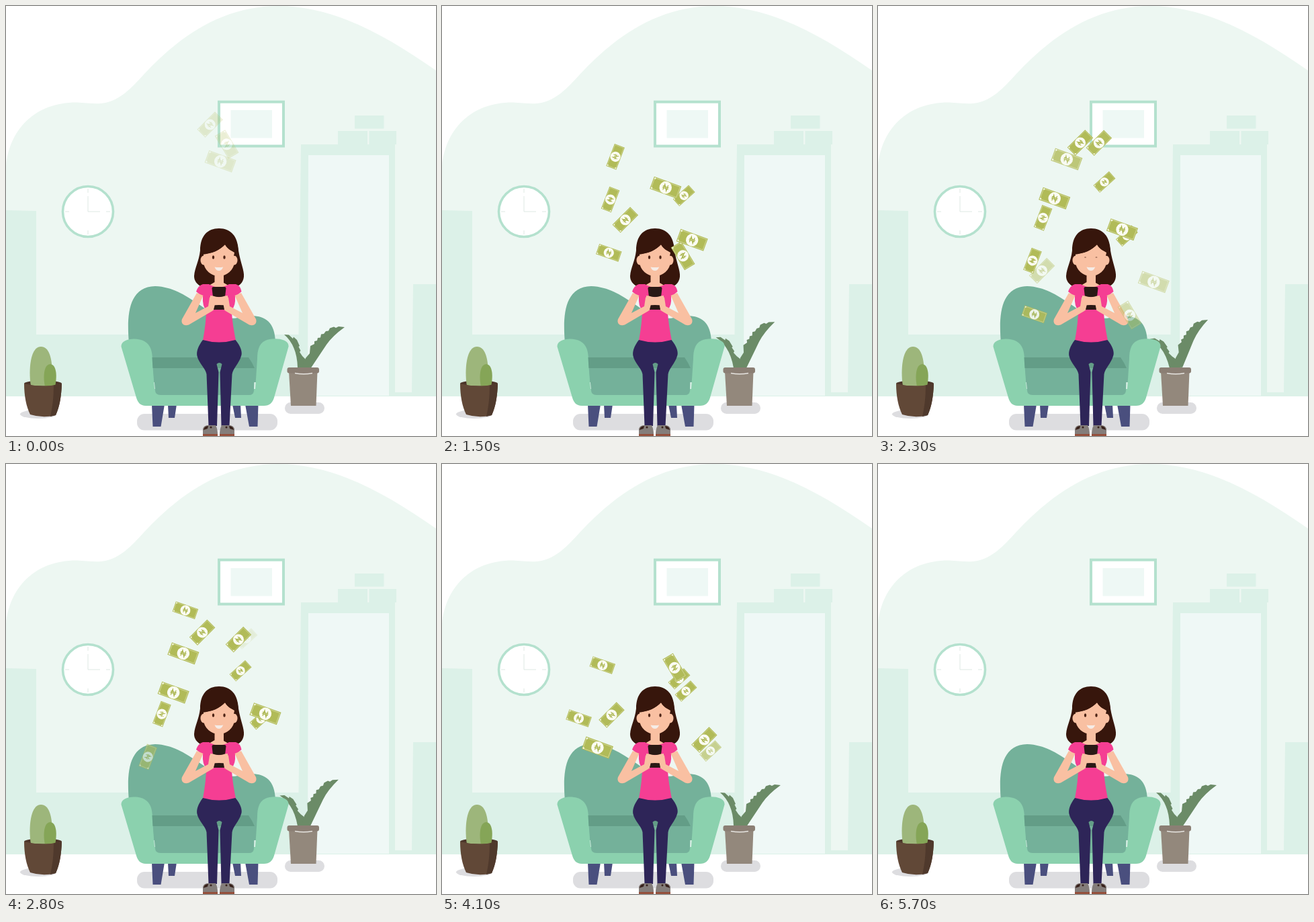
An HTML page for the animation above (5800 ms loop, 640 by 640 pixels).

```html
<!DOCTYPE html>
<html lang="en">
<head>
<meta charset="utf-8">
<title>Money rain</title>
<style>
html, body { margin: 0; width: 100%; height: 100%; overflow: hidden; background: #fff; }
svg { display: block; width: 100%; height: 100%; }
</style>
</head>
<body>
<svg viewBox="0 0 640 640" xmlns="http://www.w3.org/2000/svg">
  <defs>
    <g id="note">
      <rect x="-21.5" y="-9.8" width="43" height="19.6" fill="#b1bb58"/>
      <rect x="-20" y="-8.3" width="40" height="16.6" fill="none" stroke="#dfe4b4" stroke-width=".6"/>
      <path d="M-19.3 -7.6H19.3M-19.3 7.6H19.3" stroke="#f4f6e2" stroke-width="2.6" stroke-linecap="round" stroke-dasharray="0 38.6"/>
      <circle r="9.2" fill="#fbfcf3"/>
      <path d="M-2.6 4.4V-4.4L2.6 4.4V-4.4M-4.6 -1.1H4.6M-4.6 1.1H4.6" fill="none" stroke="#a9b44c" stroke-width="1.2"/>
    </g>
  </defs>

  <!-- room -->
  <path fill="#edf7f2" d="M0 238C5 185 42 143 106 143.5C120 144 135 147 148 144C170 139 185 124 205 102C255 48 320 0 405 0C485 0 560 40 640 96V581H0Z"/>
  <path fill="#dcf1e8" d="M0 304L45 305V489H435.5L439 206H579V575H604L606 414H640V581H0Z"/>
  <path fill="#eff8f6" d="M450 222H570V580H449Z"/>
  <path fill="#dcf1e8" d="M519 163H562.5V182.5H519ZM494 186H538V207H494ZM540.5 186H581V206H540.5Z"/>
  <rect x="317" y="142.7" width="96" height="65.8" fill="#fff" stroke="#b4e1ce" stroke-width="4"/>
  <rect x="334.5" y="155" width="61.5" height="41.5" fill="#eef8f5"/>
  <circle cx="122" cy="306" r="37.5" fill="#fff" stroke="#b4e1ce" stroke-width="3.6"/>
  <path d="M122 283V306H140M122 272V278M122 334V340M88 306H94M149 306H155" fill="none" stroke="#dde8e3"/>

  <!-- cactus -->
  <ellipse cx="48" cy="607.5" rx="27" ry="6.5" fill="#dddde0"/>
  <ellipse cx="55" cy="562" rx="28" ry="4.5" fill="#4b3529"/>
  <path fill="#9db67b" d="M37 565C34 550 34 507 52 507C70 507 70 545 68 566Z"/>
  <path fill="#85a557" d="M58 566C55 553 56 533 66 533C76 534 76 553 73 566Z"/>
  <path fill="#614837" d="M27 562Q55 569 83 562C82.500 580 80 596 74 609Q55 614 36 608C30 596 27 580 27 562Z"/>
  <path fill="#4f392c" d="M71 564.500L83 562C82.500 580 80 596 74 609L66 611Q71 590 71 564.500Z"/>

  <!-- potted plant -->
  <rect x="415" y="590" width="59" height="17" rx="8.5" fill="#dddde0"/>
  <g id="leaves" fill="#6b8b67">
    <path d="M414 489L421 489.5L427 495L428 492.5L433 497L437 506L435.5 507L438.5 513L437 515L441 521L445 525L452 538H434Q433 505 414 489Z"/>
    <path d="M440 538L446 524L452 517L453 506L459 503L459 499L463 498L464 494L468 493.5L469 488.5L473 488L476 484L480 483.5L482 479.5L488 477.5L491 479L495 477L504 478Q486 491 477 504Q465 522 453 540Z"/>
  </g>
  <path fill="#93887c" d="M421 544H463.5L461.5 595H424Z"/>
  <rect x="418.5" y="538" width="47.5" height="8.5" rx="3" fill="#8b7f74"/>
  <path d="M430 546.5Q443 549 456 546.5" fill="none" stroke="#e6e4e0" stroke-width="1.3"/>

  <!-- sofa -->
  <rect x="195" y="607" width="209" height="24.5" rx="11" fill="#dddde0"/>
  <path fill="#4a4f7e" d="M217 593H236L230.5 626H218.5ZM241 593H254L251 613H242ZM337 593H349L350 613H341ZM356 593H375.5L374.5 626H362Z"/>
  <path fill="#74b19a" d="M183 502C180 465 180 418 222 417C250 418 268 432 290 446C305 457 325 468 345 464C376 457 400 462 401 500L385 560H210Z"/>
  <path fill="#8bd1ae" d="M171.5 507C171 494 196 493 206 499C217 505 218 518 218 530L221 570H371L374 525C374 512 377 502 386 498C396 493 422 494 420.5 507L399 583C396.5 591 392 595 384 595H208C200 595 196 590 194 583Z"/>
  <path fill="#639d87" d="M217.5 523H361Q366 530 370 539H218.5Z"/>
  <path fill="#74b19a" d="M219 539H370L369 573Q368 579 362 579H230Q222 579 222 572Z"/>

  <!-- woman -->
  <path fill="#37160c" d="M289 364C289 342 300 331 317 331C335 331 345 343 346 364C349 382 355 394 354 403C353 412 347 417 341 418H291C284 414 280 409 280 402C281 389 287 381 289 364Z"/>
  <path fill="#f9c0a2" d="M310.5 396H324V412L331 416L317 424L302 416L310.5 411Z"/>
  <path fill="#f9c0a2" d="M294 369C308 368 318 363 326 355C330 362 335 364 340 366V380C340 393 328 402 317 402C306 402 294 393 294 380Z"/>
  <g id="ear"><ellipse cx="294.5" cy="378.5" rx="5" ry="7" fill="#f9c0a2"/></g>
  <use href="#ear" transform="matrix(-1 0 0 1 634 0)"/>
  <path fill="#37160c" d="M289 370C308 369 318 363 326 355C331 363 336 364 340 367L339 372Q346 370 346 366C345 345 335 335 317 335C299 335 289 346 289 370Z"/>
  <g id="eyes" fill="#4d2416">
    <ellipse cx="308.5" rx="1.7" ry="2.8"/>
    <ellipse cx="325" rx="1.7" ry="2.8"/>
  </g>
  <path fill="#f5ece7" d="M310.5 388.5Q317 389.5 323.2 388.5Q321 394 317 394Q312.5 394 310.5 388.5Z"/>
  <path fill="#f53e93" d="M302 414Q317 423 332 414H342Q349 416 350.5 425L341 433Q342 446 336 452Q336 468 342 498L339 503H296L293 498Q298 470 298 453Q292 446 293 433L283 425Q286 416 293 414Z"/>
  <g id="arm">
    <path fill="#f9c0a2" d="M284 427L293.5 431L282 457L301 447L303 434Q306 430 311 433L316 447L307 454L272 474.5C264 477 260 472 262 466Z"/>
  </g>
  <use href="#arm" transform="matrix(-1 0 0 1 634 0)"/>
  <path fill="#2a1915" d="M306.5 420Q306.5 418 309 418H325Q327.5 418 327.5 420L326 433H308ZM311 444H323.5L325 452H309Z"/>
  <path fill="#f9c0a2" d="M304 431L308 431.5Q317 435 326 431.5L330 431V446Q317 444 304 446Z"/>
  <path fill="#2e2558" d="M293 497Q317 504 341.5 497C350 507 352 516 350 521C347 532 338 539 336.5 548L332.5 625H320.5L318.5 545L321.5 533Q317.5 529 313.5 533L316.5 545L314 625H301.5L298.5 548C297 539 287 532 284.5 521C283 515 286 506 293 497Z"/>
  <g id="shoe">
    <path fill="#847d7a" d="M293 638V629Q295 624 301 624H312Q315 629 315 638Z"/>
    <path fill="#38211b" d="M294 631Q295 625 301 625L300 629Z"/>
    <circle cx="305" cy="627" r="1.5" fill="#38211b"/>
    <rect x="293" y="637" width="22" height="3" fill="#95503c"/>
  </g>
  <use href="#shoe" transform="matrix(-1 0 0 1 633 0)"/>

  <g id="notes"></g>
</svg>
<script>
const LOOP = 5800, STEP = 100;
const LIFE = 2550, FADE_IN = 330, FADE_OUT = 390;

const kinds = {
  wide: { tilt: 20, size: 1 },
  slim: { tilt: 19, size: .82 },
  upright: { tilt: -69, size: .82 },
  rising: { tilt: -45, size: .87 },
  small: { tilt: -42, size: .73 },
  diving: { tilt: 59, size: .92 }
};

// Back to front. Each note drifts sideways as k^drift while it drops as k^fall.
const flights = [
  { kind: "small", from: [357, 241], to: [394, 432], drift: 1.6, starts: [950] },
  { kind: "small", from: [331, 216], to: [412, 450], drift: 1.6, starts: [1800, 2970] },
  { kind: "small", from: [358, 257], to: [372, 410], drift: 1.6, starts: [2750] },
  { kind: "rising", from: [304, 169], to: [237, 410], drift: 1.6, starts: [-80, 1936] },
  { kind: "rising", from: [318, 167], to: [405, 460], starts: [1980] },
  { kind: "upright", from: [260, 172], to: [201, 462], drift: 2, starts: [480, 1040] },
  { kind: "slim", from: [266, 207], to: [225, 499], drift: 1.4, starts: [100] },
  { kind: "wide", from: [296, 200], to: [221, 475], drift: .7, starts: [1500, 2040] },
  { kind: "slim", from: [281, 143], to: [156, 468], drift: 1.1, fall: .74, starts: [2450, 3150] },
  { kind: "diving", from: [327, 197], to: [378, 479], starts: [-80, 3140] },
  { kind: "wide", from: [318, 225], to: [419, 424], drift: 1.3, starts: [-80, 920] }
];

const byId = id => document.getElementById(id);
const clamp = v => Math.max(0, Math.min(1, v));
const mix = (a, b, k) => a + (b - a) * k;
const smooth = k => (1 - Math.cos(Math.PI * clamp(k))) / 2;

// Eased swing through a few resting angles: [ms, degrees]
const swings = [[0, 0], [550, 6], [1950, -12], [4150, 0], [5000, -1.6], [5700, 0]];
const sway = time => swings.slice(1).reduce((angle, [end, next], i) =>
  angle + (next - swings[i][1]) * smooth((time - swings[i][0]) / (end - swings[i][0])), 0);

const eyeOpening = time => Math.max(.15, clamp(Math.abs(time - 2300) / 200));

const notes = flights.flatMap(flight => flight.starts.map(start => {
  const el = document.createElementNS("http://www.w3.org/2000/svg", "use");
  el.setAttribute("href", "#note");
  byId("notes").append(el);
  return { ...kinds[flight.kind], drift: 1, fall: 1, ...flight, start, el };
}));

function placeNote({ el, tilt, size, from, to, drift, fall, start }, time) {
  const age = time - start;
  const k = clamp(age / LIFE);
  const x = mix(from[0], to[0], k ** drift);
  const y = mix(from[1], to[1], k ** fall);
  el.setAttribute("transform", `translate(${x} ${y}) rotate(${tilt}) scale(${size})`);
  el.setAttribute("opacity", clamp(age / FADE_IN) * clamp((LIFE - age) / FADE_OUT));
}

function render(time) {
  notes.forEach(note => placeNote(note, time));
  byId("leaves").setAttribute("transform", `rotate(${sway(time)} 442 538)`);
  byId("eyes").setAttribute("transform", `translate(0 374) scale(1 ${eyeOpening(time)})`);
}

const begin = performance.now();
function tick() {
  const elapsed = (performance.now() - begin) % LOOP;
  render(Math.floor(elapsed / STEP) * STEP);
  requestAnimationFrame(tick);
}
tick();
</script>
</body>
</html>
```
